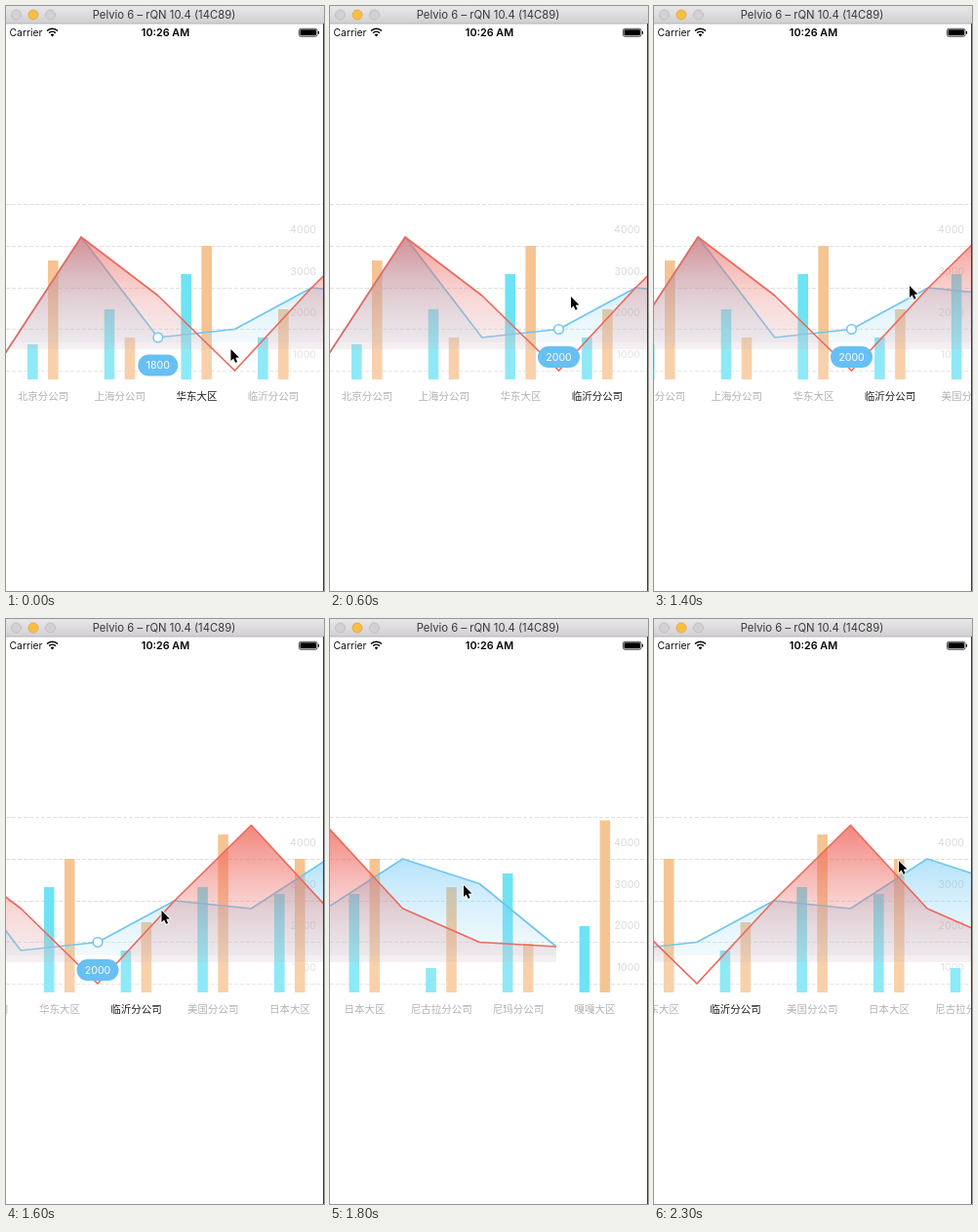
These frames come from a looping animation (326x600 px, 2400 ms). An HTML page with a canvas:

```html
<!DOCTYPE html>
<html lang="zh">
<head>
<meta charset="utf-8">
<title>Chart</title>
<style>
html, body { margin: 0; width: 100%; height: 100%; overflow: hidden; background: #fff; }
canvas { display: block; width: 326px; height: 600px; }
</style>
</head>
<body>
<canvas id="stage"></canvas>
<script>
const W = 326, H = 600, LOOP = 2400, STEP = 100;
const GAP = 78.7, FLOOR = 383, VIEW = 325;
const SANS = 'Inter, "Liberation Sans", sans-serif';
const CJK = '"Noto Sans CJK SC", "Noto Sans CJK", sans-serif';
const BLUE = '#71c5ef', RED = '#e96b5f';

const canvas = document.getElementById('stage');
const ratio = window.devicePixelRatio || 1;
canvas.width = W * ratio;
canvas.height = H * ratio;
const c = canvas.getContext('2d');
c.scale(ratio, ratio);

const names = ['北京分公司', '上海分公司', '华东大区', '临沂分公司', '美国分公司',
  '日本大区', '尼古拉分公司', '尼玛分公司', '嘎嘎大区'];
const cyanTops = [347, 311, 275, 340, 275, 282, 358, 261, 315];
const orangeTops = [261, 340, 246, 311, 221, 246, 275, 333, 206.5];
const blueYs = [357.5, 237, 340, 331.5, 289, 297, 246, 271.5, 336];
const redYs = [357.5, 237, 297, 374, 289, 211.5, 297, 331.5, 336];

// time, value...
const scrollKeys = [[1300, 0], [1400, 32], [1500, 82], [1600, 140.5], [1700, 300], [1800, 396],
  [1900, 391], [2000, 381.5], [2100, 365], [2200, 285], [2300, 190.5]];
const cursorKeys = [[0, 230.5, 352], [200, 234, 342], [600, 247, 298], [1100, 272.5, 267.5],
  [1200, 287, 271], [1300, 288, 275], [1400, 262, 287], [1600, 159.5, 299], [1800, 137, 273],
  [2000, 126, 255], [2100, 138, 254], [2300, 251, 248]];

function sample(keys, t) {
  if (t <= keys[0][0]) return keys[0].slice(1);
  for (let i = 1; i < keys.length; i++) {
    const a = keys[i - 1], b = keys[i];
    if (t <= b[0]) {
      const k = (t - a[0]) / (b[0] - a[0]);
      return a.slice(1).map((v, j) => v + (b[j + 1] - v) * k);
    }
  }
  return keys[keys.length - 1].slice(1);
}

function text(str, x, mid, size, color, align = 'center', weight = 400, family = SANS) {
  c.font = `${weight} ${size}px ${family}`;
  c.fillStyle = color;
  c.textAlign = align;
  c.fillText(str, x, mid + size * 0.37);
}

function rect(x, y, w, h, color) {
  c.fillStyle = color;
  c.fillRect(x, y, w, h);
}

function disc(x, y, r, fill, stroke, width = 1) {
  c.beginPath();
  c.arc(x, y, r, 0, Math.PI * 2);
  c.fillStyle = fill;
  c.fill();
  c.strokeStyle = stroke;
  c.lineWidth = width;
  c.stroke();
}

function pill(x, y, w, h, r) {
  c.beginPath();
  c.roundRect(x, y, w, h, r);
}

function windowBar() {
  const g = c.createLinearGradient(0, 0, 0, 18);
  g.addColorStop(0, '#e9e7e9');
  g.addColorStop(1, '#d1cfd1');
  rect(0, 0, W, 18, g);
  rect(0, 17.5, W, 1, '#b6b4b6');
  disc(10.5, 9, 5, '#d2d0d2', '#bbb9bb', 0.8);
  disc(28, 9, 5, '#f8be45', '#e0a63a', 0.8);
  disc(45.5, 9, 5, '#d2d0d2', '#bbb9bb', 0.8);
  text('Pelvio 6 – rQN 10.4 (14C89)', 162, 9.2, 11.3, '#3a3a3a');
}

function statusBar() {
  text('Carrier', 3.5, 27.5, 10.4, '#111', 'left');
  text('10:26 AM', 163.5, 27.5, 10.8, '#000', 'center', 600);
  c.strokeStyle = '#000';
  c.lineWidth = 1.6;
  for (const r of [4.7, 7.8]) {
    c.beginPath();
    c.arc(47.5, 31, r, -Math.PI * 0.75, -Math.PI * 0.25);
    c.stroke();
  }
  c.beginPath();
  c.moveTo(47.5, 31.5);
  c.arc(47.5, 31.3, 2.6, -Math.PI * 0.75, -Math.PI * 0.25);
  c.fillStyle = '#000';
  c.fill();
  pill(300.5, 23.3, 18.5, 8, 1.8);
  c.lineWidth = 0.7;
  c.stroke();
  pill(301.5, 24.3, 16.5, 6, 0.8);
  c.fill();
  pill(319.8, 25.8, 1.2, 3, 0.6);
  c.fill();
}

function grid() {
  c.strokeStyle = '#e0e0e0';
  c.lineWidth = 1;
  c.setLineDash([4, 2]);
  for (let i = 0; i < 5; i++) {
    const y = [203.5, 246.5, 289.5, 331.5, 374.5][i];
    c.beginPath();
    c.moveTo(0, y);
    c.lineTo(VIEW, y);
    c.stroke();
  }
  c.setLineDash([]);
  for (let i = 1; i < 5; i++) {
    text(i * 1000, 318, 400 - i * 42.75, 10.6, '#dadada', 'right');
  }
}

function trace(ys, x0) {
  c.beginPath();
  ys.forEach((y, i) => c.lineTo(x0 + i * GAP, y));
}

function area(ys, x0, top, bottom, stops, line) {
  const g = c.createLinearGradient(0, top, 0, FLOOR);
  const span = FLOOR - top, end = (bottom - top) / span;
  stops.forEach(([y, color]) => g.addColorStop((y - top) / span, color));
  g.addColorStop(end, 'rgba(255,255,255,0.12)');
  g.addColorStop(1, 'rgba(255,255,255,0.12)');
  trace(ys, x0);
  c.lineTo(x0 + GAP * (ys.length - 1), FLOOR);
  c.lineTo(x0, FLOOR);
  c.closePath();
  c.fillStyle = g;
  c.fill();
  trace(ys, x0);
  c.strokeStyle = line;
  c.lineWidth = 1.7;
  c.lineJoin = 'round';
  c.stroke();
}

function tooltip(x, y, value) {
  disc(x, y, 4.8, '#fff', BLUE, 1.5);
  const w = value === 1800 ? 41 : 43;
  pill(x - w / 2, y + 17.5, w, 22, 11);
  c.fillStyle = '#67c0f3';
  c.fill();
  text(value, x, y + 28.5, 10.6, '#fff');
}

function pointer(x, y) {
  c.beginPath();
  [[0, 0], [0, 12], [2.7, 9.6], [4.6, 13.8], [6.6, 12.9], [4.8, 8.8], [8.4, 8.6]]
    .forEach(([dx, dy]) => c.lineTo(x + dx, y + dy));
  c.closePath();
  c.lineJoin = 'round';
  c.strokeStyle = '#fff';
  c.lineWidth = 1.8;
  c.stroke();
  c.fillStyle = '#000';
  c.fill();
}

function draw(t) {
  const [scroll] = sample(scrollKeys, t);
  const picked = t < 300 ? 2 : 3;
  const x0 = -1.6 - scroll;

  rect(0, 0, W, H, '#fff');
  c.save();
  c.beginPath();
  c.rect(0, 18, VIEW, H);
  c.clip();
  grid();
  names.forEach((name, i) => {
    const mid = 38 + i * GAP - scroll;
    rect(mid - 16, cyanTops[i], 10.6, FLOOR - cyanTops[i], '#6ee3f4');
    rect(mid + 5, orangeTops[i], 10.6, FLOOR - orangeTops[i], '#f6c492');
    text(name, mid, 400.5, 10.5, i === picked ? '#1c1c1c' : '#b2b2b2', 'center', 400, CJK);
  });
  area(blueYs, x0, 237, 345.5, [
    [237, 'rgba(106,198,246,0.54)'],
    [290, 'rgba(120,204,246,0.3)'],
    [345, 'rgba(190,228,246,0.2)']
  ], BLUE);
  area(redYs, x0, 211, 352.5, [
    [211, 'rgba(238,92,80,0.74)'],
    [250, 'rgba(238,100,90,0.54)'],
    [300, 'rgba(236,135,130,0.32)'],
    [352, 'rgba(220,205,213,0.3)']
  ], RED);
  if (t < 1800) tooltip(x0 + picked * GAP, blueYs[picked], picked === 2 ? 1800 : 2000);
  c.restore();

  windowBar();
  statusBar();
  rect(325, 18, 1, H - 18, '#3c3c3c');
  pointer(...sample(cursorKeys, t));
}

const start = performance.now();
function tick() {
  const t = (performance.now() - start) % LOOP;
  draw(Math.floor(t / STEP) * STEP);
  requestAnimationFrame(tick);
}
tick();
</script>
</body>
</html>
```
